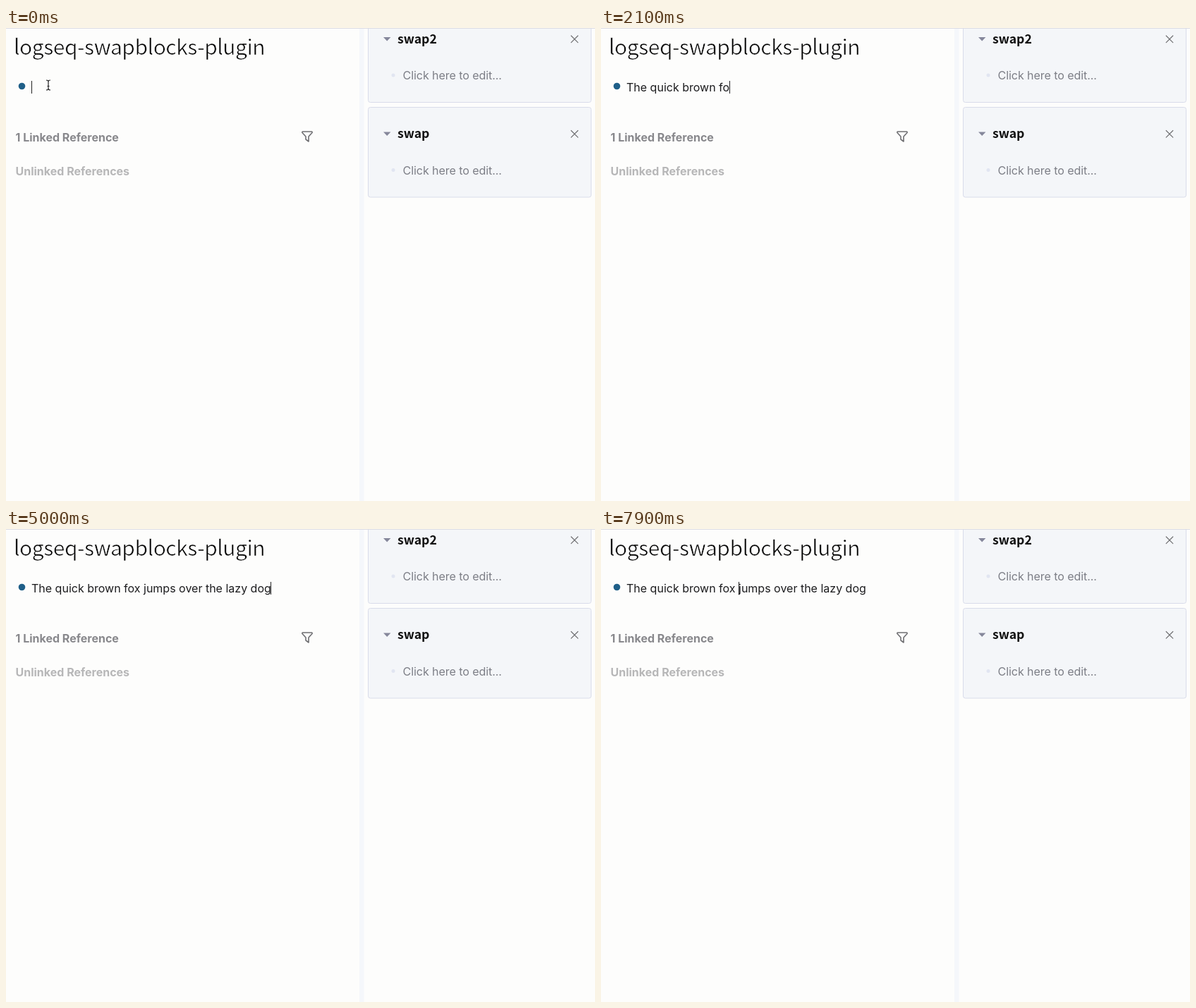
Animation, 835 px wide and 671 px high, one loop 8000 ms. Source, as an HTML page:

```html
<!DOCTYPE html>
<html lang="en">
<head>
<meta charset="utf-8">
<title>Swap blocks</title>
<style>
  html, body { margin: 0; width: 100%; height: 100%; overflow: hidden; background: #fdfdfc; }
  svg { display: block; width: 835px; height: 671px; }
  text { font: 16px Inter, sans-serif; white-space: pre; }
  .title, .name { font-family: "Noto Sans CJK JP", "Noto Sans CJK SC", "Noto Sans CJK", sans-serif; fill: #111; }
  /* the page-coloured outline thins the strokes to a light weight */
  .title { font-size: 30px; font-weight: 300; letter-spacing: -.46px; fill: #000; stroke: #fdfdfc; stroke-width: .7px; }
  .name { font-size: 17.6px; font-weight: 700; }
  .head { font-weight: 700; }
  .hint { fill: #7c7e86; letter-spacing: -.05px; }
  .line { fill: none; stroke: #6f6f72; stroke-linejoin: round; stroke-linecap: round; }
</style>
</head>
<body>
<svg viewBox="0 0 835 671">
  <defs>
    <g id="tools">
      <path d="M535 -2.5h10.4l-5.2 5.6z" fill="#85879b"/>
      <path class="line" stroke-width="1.2" d="M801.2 -4.5l9.6 9.6m0 -9.6l-9.6 9.6"/>
      <circle cx="549" cy="51.5" r="2.5" fill="#e1e5f1"/>
      <text class="hint" x="562.5" y="57.5">Click here to edit...</text>
    </g>
  </defs>
  <rect width="835" height="671" fill="#fdfdfc"/>
  <rect x="501" width="6.5" height="671" fill="#f5f7fb"/>
  <g fill="#f4f6f9" stroke="#d9dcea">
    <rect x="513.5" y="-20.5" width="316" height="126" rx="3"/>
    <rect x="513.5" y="112.5" width="316" height="127.5" rx="3"/>
  </g>
  <path d="M0 .5H835" stroke="#dcdce4"/>

  <text class="title" x="11" y="38">logseq-swapblocks-plugin</text>
  <circle cx="22.5" cy="82.5" r="4.8" fill="#1f5f88"/>
  <text id="block" x="36" y="90" fill="#1c1c1e"></text>
  <path id="caret" d="M.5 75V93" stroke="#222"/>

  <text class="head" x="13.5" y="160.8" fill="#88888c">1 Linked Reference</text>
  <text class="head" x="13.5" y="209.3" fill="#b7b7b8">Unlinked References</text>
  <path class="line" stroke-width="1.6" transform="translate(415 142)"
    d="M5.5 5h13a1 1 0 0 1 .5 1.5L14 12v7l-4-3v-4L5 6.5A1 1 0 0 1 5.5 5"/>

  <use href="#tools" y="15.5"/>
  <text class="name" x="555" y="21.5">swap2</text>
  <use href="#tools" y="150"/>
  <text class="name" x="555" y="156">swap</text>

  <path id="beam" fill="none" stroke="#222" stroke-width="1.2"
    d="M-3 -7q3 0 3 2q0 -2 3 -2M0 -5V5M-3 7q3 0 3 -2q0 2 3 2M-1.5 1.5h3"/>
  <path id="arrow" fill="#111" stroke="#fff" stroke-width=".8"
    d="M0 0V13.2L3 10.4L5.2 15.4L7.5 14.4L5.3 9.5H9.4z"/>
</svg>
<script>
  const LOOP = 8000;
  const SENTENCE = "The quick brown fox jumps over the lazy dog";
  // [ms, characters typed]
  const TYPING = [[300, 0], [400, 1], [1500, 12], [2400, 22], [2500, 22], [3000, 27], [3800, 36], [4500, 43]];
  // [ms, x, y]
  const POINTER = [[5400, 60, 81], [5800, 436, 58], [6500, 436, 58]];
  // [ms, caret index], one word to the left at each step
  const WORD_JUMPS = [[6700, 40], [6900, 35], [7100, 31], [7300, 26], [7500, 20]];

  const [block, caret, beam, arrow] = ["block", "caret", "beam", "arrow"].map(id => document.getElementById(id));

  function track(keys, t, col = 1, ease = k => k) {
    if (t <= keys[0][0]) return keys[0][col];
    for (let i = 1; i < keys.length; i++) {
      const a = keys[i - 1], b = keys[i];
      if (t < b[0]) return a[col] + (b[col] - a[col]) * ease((t - a[0]) / (b[0] - a[0]));
    }
    return keys[keys.length - 1][col];
  }

  const smooth = k => k * k * (3 - 2 * k);
  const show = (el, on) => el.setAttribute("visibility", on ? "visible" : "hidden");
  const place = (el, x, y) => el.setAttribute("transform", `translate(${x} ${y})`);

  function draw(time) {
    const t = Math.floor(time / 100) * 100;
    const typed = Math.floor(track(TYPING, t) + 1e-6);
    block.textContent = SENTENCE.slice(0, typed);

    let index = typed;
    for (const [at, pos] of WORD_JUMPS) if (t >= at) index = pos;
    const advance = index ? block.getSubStringLength(0, index) : 0;
    place(caret, Math.floor(36 + advance), 0);

    const x = track(POINTER, t, 1, smooth), y = track(POINTER, t, 2, smooth);
    const moving = t >= 5400 && t < 6500;
    const overText = t < 400 || (moving && y > 70);
    place(beam, x, y);
    place(arrow, x, y);
    show(beam, overText);
    show(arrow, moving && !overText);
  }

  const start = performance.now();
  function tick() {
    draw((performance.now() - start) % LOOP);
    requestAnimationFrame(tick);
  }
  tick();
</script>
</body>
</html>
```
